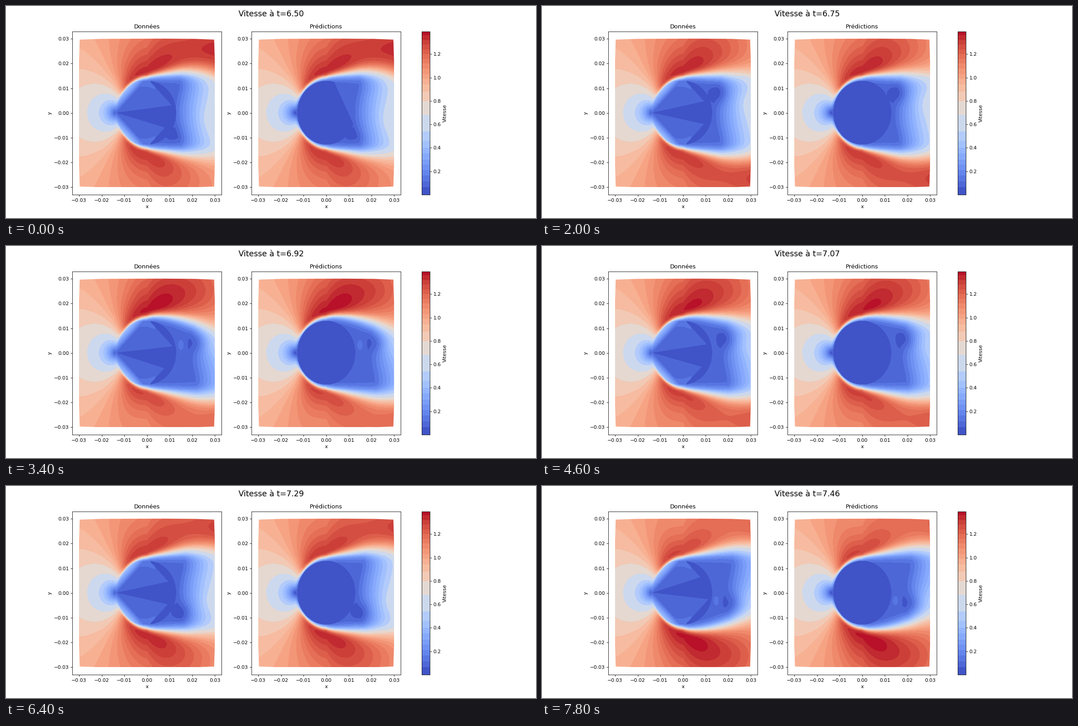
A matplotlib script that plays this animation: 1183 by 473 pixels, repeating every 8000 ms.

```python
import matplotlib
import matplotlib.pyplot as plt
import numpy as np
from matplotlib.animation import FuncAnimation
from matplotlib.colors import BoundaryNorm, ListedColormap
from matplotlib.patches import Polygon

WIDTH, HEIGHT, DPI = 1183, 473, 64
K = WIDTH / 15 / DPI              # point scale of a 15 inch wide layout
FRAMES, INTERVAL = 40, 200
T_START, T_STEP = 6.5, 0.0247
T_REF, PERIOD = 6.747, 0.1555     # vortex shedding cycle
RADIUS, WALL = 1.28, 1.42         # lengths in hundredths
V_MAX = 1.393

plt.rcParams.update({
    "font.family": "DejaVu Sans",
    "font.size": 10 * K,
    "axes.titlesize": 12 * K,
    "axes.titlepad": 6 * K,
    "axes.labelpad": 4 * K,
    "axes.linewidth": 0.8 * K,
    "figure.titlesize": 16 * K,
})
for tick in ("xtick", "ytick"):
    plt.rcParams[tick + ".major.size"] = 3.5 * K
    plt.rcParams[tick + ".major.pad"] = 3.5 * K
    plt.rcParams[tick + ".major.width"] = 0.8 * K

LEVELS = np.array([
    0, .065, .115, .165, .21, .255, .3, .35, .4, .46, .54, .68, .8, .88, .94,
    .985, 1.03, 1.075, 1.12, 1.16, 1.2, 1.24, 1.28, 1.32, 1.36, V_MAX])
MIDS = (LEVELS[1:] + LEVELS[:-1]) / 2
CMAP = ListedColormap(matplotlib.colormaps["coolwarm"](MIDS / V_MAX))
NORM = BoundaryNorm(LEVELS, CMAP.N)

X, Y = np.meshgrid((np.arange(304) + .5) / 304 * 6 - 3,
                   (np.arange(334) + .5) / 334 * 6 - 3)
AY = np.abs(Y)
R = np.hypot(X, Y)
XR = np.maximum(X, 0)
INSIDE = R < RADIUS


def step(d):
    return .5 * (1 + np.tanh(d))


def gauss(dx, dy, size):
    return np.exp(-(dx ** 2 + dy ** 2) / size ** 2)


def outer_speed():
    """Potential flow round a blunt body, softly capped."""
    z = (X + 1j * Y) * np.maximum(1, 1.2 / R)
    v = np.abs(1 - 1.44 / z ** 2 + .3 / z)
    return v / (1 + (v / 1.38) ** 10) ** .1


OUTER = outer_speed()
THICK = .12 + .11 * XR
# The boundary layer thins towards the front of the cylinder.
AHEAD = np.clip(X, -1, 0)
FRONT = step((R - WALL - .09 * AHEAD) / (.12 + .05 * AHEAD))
SWELL_MASK = np.exp(-((AY - 2.4) / 1.4) ** 2) \
    * np.exp(-(np.minimum(X, 0) / .8) ** 2)


def swell(phase):
    """Speed-up of the free stream beside the wake."""
    wave = np.cos(2 * np.pi * (phase - .2 - .02 * XR ** 2))
    return .18 * (1 - np.exp(-XR)) + (.07 + .025 * XR) * wave


def layer(phase):
    """Height of one shear layer behind the cylinder."""
    lag = phase + .03 * (3 - XR) - .21
    dip = np.exp(1.9 * (np.cos(2 * np.pi * lag) - 1))
    return WALL + .46 * (XR / 3) ** .75 - 1.5 * (XR / 3) ** 2 * dip


def wake_speed(phase):
    """Slow flow behind the cylinder with the two rolling vortices."""
    start = 1.55 + .4 * np.cos(4 * np.pi * (phase - .17))
    start = start + .2 * np.minimum(AY, 1.3) ** 2
    rise = np.clip((X - start) / 1.5, 0, 1)
    gain = .42 + .06 * np.cos(4 * np.pi * (phase + .05))
    v = .08 + gain * rise
    v += .07 * gauss(X - 2.9, Y - .35 * np.cos(2 * np.pi * phase), .5)
    for side, shift in ((1, 0), (-1, .5)):
        p = (phase + shift + .5) % 1 - .5
        power = np.exp(-(p - .02) ** 2 / .03)
        cx, cy = 1.5 + 4.5 * p + 4 * p * p, side * min(.95, .8 - 3.5 * p)
        v *= 1 - .65 * power * gauss(X - cx, Y - cy, .4)
        late = np.exp(-((p - .12) / .05) ** 2)
        v += .06 * late * gauss(X - cx + .55, (Y - cy + side * .1) / 1.5, .2)
    return v


def flow(phase):
    wake = wake_speed(phase)
    top = step((Y - layer(phase)) / THICK)
    bottom = step((-Y - layer(phase + .5)) / THICK)
    mix = np.where(X < 0, FRONT, np.minimum(top + bottom, 1))
    stream = OUTER + SWELL_MASK * np.where(Y > 0, swell(phase),
                                           swell(phase + .5))
    return wake + (stream - wake) * mix


def measured(v, phase):
    """Cylinder filled by coarse triangles spanning the hole."""
    slope = Y / (X + 1.36)
    centre = -.15 * np.sin(2 * np.pi * phase)
    core = np.where(np.abs(slope - centre) < .2, .05, .085)
    core = core + .07 * np.clip((AY - .85 + .3 * XR) / .45, 0, 1) * (X < .35)
    wedge = (X > .15) & (AY + X > 1.38)
    core = np.where(wedge, .045, core)
    v = np.where(INSIDE, core, v)
    chord = (AY - X - 1.31) / np.sqrt(2)
    edge = (X < 0) & (R < 1.4) & (chord > 0)
    return np.where(edge, np.maximum(v, .07 + .95 * chord), v)


def predicted(v, phase):
    """Cylinder resolved as a clean disc, nearly at rest."""
    lift = .045 * max(0, np.cos(4 * np.pi * (phase - .375))) ** 2
    core = .03 + lift * step((X - .45 + .5 * Y) / .3)
    return np.where(INSIDE, core, v)


fig = plt.figure(figsize=(WIDTH / DPI, HEIGHT / DPI), dpi=DPI,
                 facecolor="white")
title = fig.suptitle("")

CORNER = [(-.0297, .0297), (-.02, .03), (.007, .0301), (.021, .03),
          (.0297, .0297), (.03, .021)]
OUTLINE = CORNER + [(x, -y) for x, y in CORNER[::-1]] \
    + [(-.03, -.021), (-.03, .021)]


def panel(left, name):
    ax = fig.add_axes([left, .11, .62 / 2.2, .77])
    image = ax.imshow(np.zeros_like(X), cmap=CMAP, norm=NORM, origin="lower",
                      extent=(-.03, .03, -.03, .03), aspect="auto",
                      interpolation="nearest")
    edge = Polygon(OUTLINE, facecolor="none", edgecolor="none")
    ax.add_patch(edge)
    image.set_clip_path(edge)
    ax.set(xlim=(-.033, .033), ylim=(-.033, .033), title=name,
           xlabel="x", ylabel="y")
    ticks = np.arange(-3, 4) / 100
    ax.set_xticks(ticks)
    ax.set_yticks(ticks)
    return image


def color_scale():
    ax = fig.add_axes([.7842, .11, .77 * HEIGHT / 20 / WIDTH, .77])
    ax.pcolormesh([0, 1], LEVELS, MIDS[:, None], cmap=CMAP, norm=NORM)
    ax.set(ylim=(0, V_MAX), xticks=[], yticks=np.arange(1, 7) / 5)
    ax.yaxis.tick_right()
    ax.yaxis.set_label_position("right")
    ax.set_ylabel("Vitesse")


data_image = panel(.125, "Données")
model_image = panel(.125 + .62 * 1.2 / 2.2, "Prédictions")
color_scale()


def draw(n):
    t = T_START + T_STEP * n
    phase = (t - T_REF) / PERIOD
    v = flow(phase)
    data_image.set_data(np.clip(measured(v, phase), .001, V_MAX - .001))
    model_image.set_data(np.clip(predicted(v, phase), .001, V_MAX - .001))
    title.set_text(f"Vitesse à t={t:.2f}")
    return data_image, model_image, title


anim = FuncAnimation(fig, draw, frames=FRAMES, interval=INTERVAL, repeat=True)
plt.show()
```
